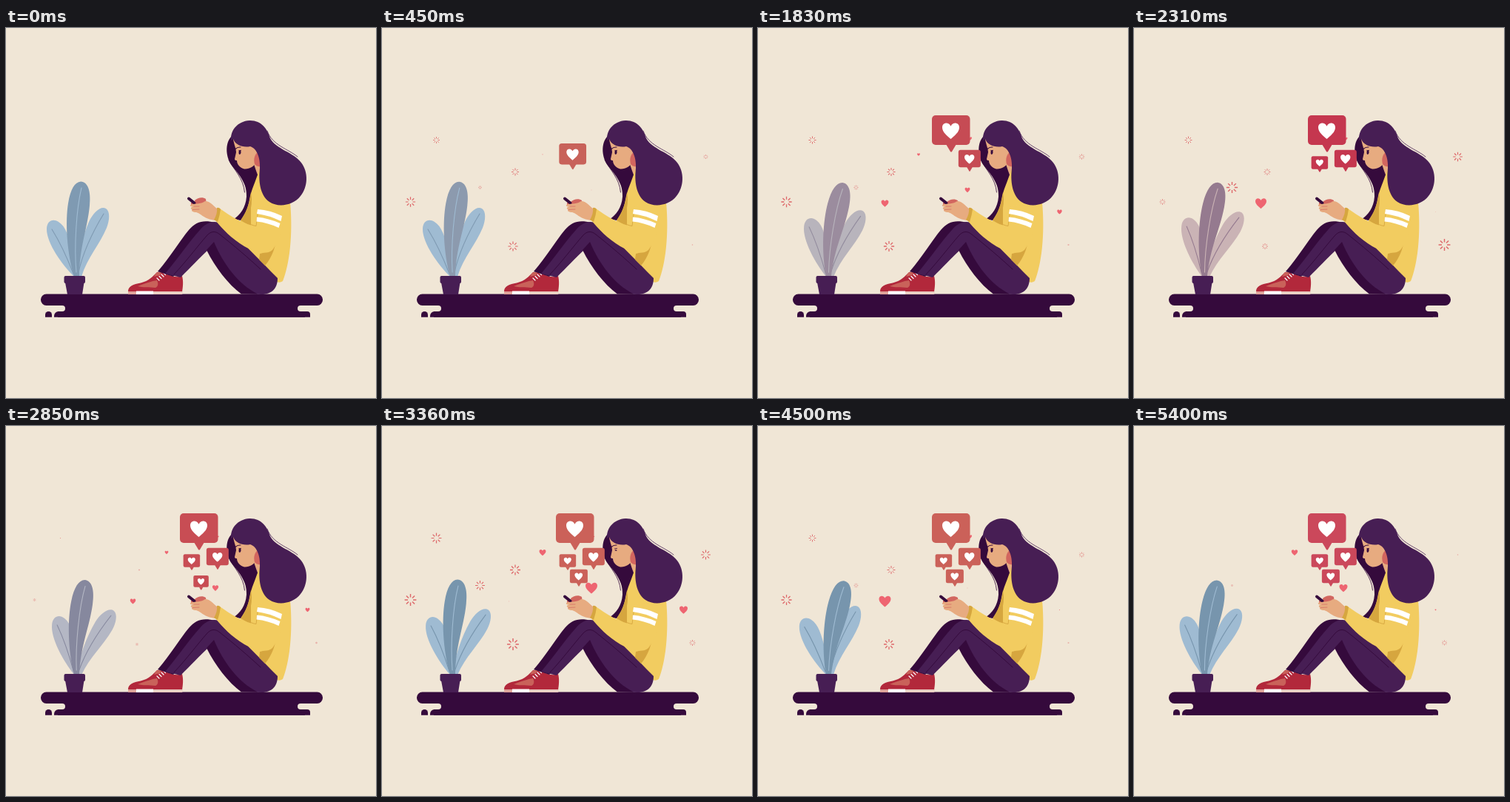
Animation of 500x500 px, one loop 5430 ms. Source, as an HTML page with a canvas:

```html
<!DOCTYPE html>
<html lang="en">
<head>
<meta charset="utf-8">
<title>Girl with phone</title>
<style>
html, body { margin: 0; width: 100%; height: 100%; overflow: hidden; background: #f0e6d6; }
canvas { display: block; width: 500px; height: 500px; }
</style>
</head>
<body>
<canvas id="stage" width="500" height="500"></canvas>
<script>
const ctx = document.getElementById('stage').getContext('2d');
const LOOP = 5430;
const CREAM = '#f0e6d6', DARK = '#350a3c', PURPLE = '#471e54', YELLOW = '#f2cc60',
  OCHRE = '#d6a63f', SKIN = '#e7ab80', BLUSH = '#d2665f', RED = '#b2283b', WHITE = '#fff';

// Shared key times for the slow, organic curves
const KEYS = [0, 450, 1260, 2310, 3360, 4500, 5400, 5430];

const fill = (d, color) => { ctx.fillStyle = color; ctx.fill(new Path2D(d)); };

function line(d, color, width = 1) {
  ctx.strokeStyle = color;
  ctx.lineWidth = width;
  ctx.lineCap = 'round';
  ctx.stroke(new Path2D(d));
}

function box(x, y, w, h, r, color) {
  ctx.fillStyle = color;
  ctx.beginPath();
  ctx.roundRect(x, y, w, h, r);
  ctx.fill();
}

function segment(t) {
  let i = 0;
  while (i < KEYS.length - 2 && t >= KEYS[i + 1]) i++;
  return [i, (t - KEYS[i]) / (KEYS[i + 1] - KEYS[i])];
}

// Smooth curve through one value per key time
function spline(values, t) {
  const v = i => values[Math.min(i, values.length - 1)];
  const slope = i => i < 1 || i > 5 ? 0 : (v(i + 1) - v(i - 1)) / (KEYS[i + 1] - KEYS[i - 1]);
  const [i, u] = segment(t), span = KEYS[i + 1] - KEYS[i];
  const u2 = u * u, u3 = u2 * u;
  return v(i) * (2 * u3 - 3 * u2 + 1) + v(i + 1) * (3 * u2 - 2 * u3)
    + span * (slope(i) * (u3 - 2 * u2 + u) + slope(i + 1) * (u3 - u2));
}

function tint(colors, t) {
  const [i, u] = segment(t);
  const at = k => colors[Math.min(k, colors.length - 1)];
  const mix = s => {
    const a = at(i) >> s & 255, b = at(i + 1) >> s & 255;
    return Math.round(a + (b - a) * u);
  };
  return `rgb(${mix(16)},${mix(8)},${mix(0)})`;
}

function backOut(u) {
  if (u <= 0) return 0;
  if (u >= 1) return 1;
  const c = 1.35, k = u - 1;
  return 1 + (c + 1) * k * k * k + c * k * k;
}

function heart(x, y, w, color) {
  if (w < 0.4) return;
  ctx.save();
  ctx.translate(x, y);
  ctx.scale(w / 20, w / 20);
  fill('M0,9.5 C-4,6 -10,1.5 -10,-4 C-10,-10 -2.5,-11 0,-5.5 C2.5,-11 10,-10 10,-4 C10,1.5 4,6 0,9.5Z', color);
  ctx.restore();
}

const HEARTS = [
  [217, 171, [0, 1, 9, 0, 9, 0, 8.5]],
  [283, 219, [0, 0.6, 16, 0, 16, 0.8, 11]],
  [171.5, 237, [0, 0, 1.2, 15, 0.8, 16, 0]],
  [407.5, 248.5, [0, 0, 13.5, 0.7, 11, 1, 2]],
  [286.5, 149.5, [0, 0, 5, 4, 1.5, 5, 0]]
];

// x, y, largest radius, delay
const SPARKS = [
  [73.5, 151.5, 7, 55], [180, 194.5, 7, 20], [38.5, 235, 8, -40], [132.5, 215.5, 8, 205],
  [177, 295, 8, -35], [437.5, 174, 7.2, 150], [419.5, 293, 8, 345]
];
const SPARK_PERIOD = 1340;

function spark([x, y, max, delay], t) {
  if (t < delay) return;
  const r = max * (0.5 - 0.5 * Math.cos(2 * Math.PI * (t - delay) / SPARK_PERIOD));
  if (r < 0.3) return;
  ctx.strokeStyle = '#dd6668';
  ctx.lineCap = 'butt';
  ctx.lineWidth = Math.max(0.5, r * 0.18);
  ctx.beginPath();
  for (let i = 0; i < 8; i++) {
    const c = Math.cos(i * Math.PI / 4), s = Math.sin(i * Math.PI / 4);
    ctx.moveTo(x + c * r * 0.45, y + s * r * 0.45);
    ctx.lineTo(x + c * r, y + s * r);
  }
  ctx.stroke();
}

// tip x, tip y, width; one pops out of the phone after another
const BUBBLES = [[261, 168, 51.5], [286, 194, 30], [251, 195, 22.5], [266, 217, 24]];
const BUBBLE_TINTS = [0xc8625a, 0xc8625a, 0xc8625a, 0xc5374f, 0xcb6159, 0xcb6159, 0xcb485b];

function bubble([x, y, w], i, t) {
  const p = backOut((t - 371 - i * 791) / 354);
  if (p <= 0) return;
  const color = tint(BUBBLE_TINTS, t);
  ctx.save();
  ctx.translate(250 + (x - 250) * p, 250 + (y - 250) * p);
  ctx.scale(p * w / 51.5, p * w / 51.5);
  box(-26, -50, 51.5, 40, 5, color);
  fill('M-7,-11 L7,-11 L1,-1 Q0,0 -1,-1Z', color);
  heart(-0.5, -29, 23, WHITE);
  ctx.restore();
}

function leaf(shape, rib, color, ribColor, angle) {
  ctx.save();
  ctx.translate(94, 335);
  ctx.rotate(angle);
  ctx.translate(-94, -335);
  fill(shape, color);
  line(rib, ribColor, 1.1);
  ctx.restore();
}

const SIDE_TINTS = [0x9fbbd2, 0x9fbbd2, 0xa3b6c4, 0xcab3b5, 0x9fbbd2];
const MID_TINTS = [0x7f9ab2, 0x8c9aae, 0xa3a2b0, 0x957a8f, 0x7795ad];
const RIB_TINTS = [0x7f9ab2, 0x7f9ab2, 0x8f9fad, 0x957a8f, 0x7795ad];

function plant(t) {
  const side = tint(SIDE_TINTS, t), mid = tint(MID_TINTS, t), rib = tint(RIB_TINTS, t);
  leaf('M92,336 C76,320 55,291 55,272 C55,261 63,257 71,262 C81,268 85,283 90,300 C94,315 96,325 96,336Z',
    'M62,272 Q77,296 91,332', side, rib, spline([0, 0, 4, 11, 5, 1, 8], t) / 78);
  leaf('M94,336 C97,310 102,285 112,262 C118,249 128,240 135,244 C141,248 140,260 136,270 C127,292 110,310 102,336Z',
    'M132,251 Q106,294 98,330', side, rib, spline([0, 0, 2, 11, 9, 0, 8], t) / 91);
  leaf('M92,336 C82,302 80,262 84,237 C87,218 93,208 101,207.5 C111,208 115,221 113,240 C110,272 99,296 99,336Z',
    'M95,330 C92,295 95,245 102,216', mid, side, spline([0, 3, 12, 12, 1, 15, 11], t) / 127);
  fill('M80,344 L105.5,344 L103,360 L83,360Z', PURPLE);
  box(78.5, 335, 28.5, 10, 2, PURPLE);
}

function floor() {
  box(47, 359.5, 381, 15.5, 7.5, DARK);
  box(70, 370, 334, 20.7, 0, DARK);
  box(65, 383, 346, 7.7, [6, 4, 0, 0], DARK);
  box(53, 383, 9, 7.7, [4.5, 4.5, 0, 0], DARK);
  box(60, 375, 20, 8, [0, 4, 4, 0], CREAM);
  box(394, 375, 20, 8, [4, 0, 0, 4], CREAM);
}

function head(t) {
  fill('M305,146 C295,156 297,176 306,187 C316,199 326,211 325,228 C324,243 316,253 308,258 L326,262 C334,238 337,215 343,200 L340,180Z', DARK);
  line('M301,178 C308,192 321,203 322.5,222', DARK, 0.8);
  fill('M333,175 L344,172 L344,208 C341,202 337,190 335,184Z', SKIN);
  fill('M307,150 C308,157 311,163 311,168 L309,177 Q309,179 312,179 C312,184 316,189 322,190.5 C329,191 335,187 338,182 L343,175 L338,155Z', SKIN);
  fill('M343,166 C336,169 334,177 336,184 C338,186 341,188 344,187Z', BLUSH);
  line('M310,163.5 Q313,160.5 317,161', DARK, 1.1);
  const shut = Math.max(0, 1 - Math.abs(t - 3360) / 90);
  ctx.fillStyle = DARK;
  ctx.beginPath();
  ctx.ellipse(316, 168, 1.5, 3 - 2.3 * shut, 0.1, 0, 7);
  ctx.fill();
  line('M314.5,165.8 L317.5,165.4', DARK, 0.8);
}

function torso() {
  fill('M342,192 C338,206 331,219 329,232 C327,244 322,253 317,260 L318,290 L366,343 Q370,345 374,342 C383,320 388,280 384,235 L360,198Z', YELLOW);
  fill('M331,222 C329,240 323,252 317,260 L331,268 L331,243 Q333,232 331,222Z', OCHRE);
}

function legs() {
  fill('M205,329 C222,309 236,286 247,273 C257,261 267,259 283,263 L272,290 L226,336Z', DARK);
  fill('M215,332 C232,312 249,287 262,273 C271,262 283,258 294,267 C317,286 345,316 367,338 C367,350 361,360 345,360 L320,359 C302,346 285,325 273,300 C262,310 249,324 236,337Z', PURPLE);
  fill('M271,300 L281,289 C294,320 314,346 340,359.5 L318,359.5 C300,346 283,324 271,300Z', DARK);
  line('M227,333 C243,316 258,296 271,281 C277,274 283,274 289,279 C308,294 328,311 344,326', DARK, 1);
}

function shoe() {
  fill('M165,356 C165,349 172,346 182,344.5 C193,342 199,335 204,330 L215,329 C219,335 230,338 238,335 C240,343 239,350 238,357Z', RED);
  fill('M178,349 C188,345 197,342 204,341 C206,345 206,349 202,351 C193,350 185,351 178,349Z', '#c9625a');
  fill('M203,331 L211,329 L208,334 L200,336Z', '#c9625a');
  line('M204,338 l3,3 M207,335.5 l3,3 M210,333 l3,3 M213,331 l2.5,2.5', WHITE, 1.2);
  box(165, 356, 73.5, 4, 1, '#ead0c4');
  box(165, 356, 11, 4, 1, '#dfa39a');
  box(176, 355.5, 23, 4.5, 0, WHITE);
}

function arm(t) {
  fill('M343,305 C357,303 363,290 366,275 C366,294 359,311 350,321 L342,313Z', OCHRE);
  fill('M289,244 C303,254 322,266 338,268 L342,240 L380,238 C377,262 369,289 360,300 C351,308 335,302 322,295 C305,285 292,271 283,260Z', YELLOW);
  line('M322,261 Q332,267 338,267.5 L340,252', OCHRE, 0.9);
  fill('M340,245 Q357,246 373,254 L371.5,261 Q355,253 339,251Z', WHITE);
  fill('M339,255.5 Q355,257 370.5,264 L368.5,270 Q354,263 338.5,261.5Z', WHITE);

  const tap = spline([0, 2, 2, 2, 0, 1, 0], t);
  fill(`M255,${233 + tap} C259,${229 + tap} 266,${228 + tap} 270,${231 + tap} L271,240 L256,241Z`, BLUSH);
  fill('M250,236 L258,235 L257,241 L250,241Z', BLUSH);
  line('M247,230.5 L254.5,236.5', DARK, 4);
  fill('M288,246 C281,242 277,234 269,234 C264,238 257,237 250,238.5 C247,240 250,242 254,241.5 C250,241.5 248,244 252,245.5 C249,247 253,249 257,249 C264,251 267,258 283,260Z', SKIN);
  line('M254,241 L261,241 M252,245.5 L261,245', BLUSH, 0.7);
  fill('M285,243 Q288,242 290,245 Q289,253 286,262 L281,259 Q286,251 285,243Z', OCHRE);
}

function hair() {
  fill('M304,152 C303,138 313,126 329,125 C345,124.5 353,136 357,149 C365,164 389,168 399,182 C409,195 408,215 398,227 C388,240 368,243 356,235 C343,226 341,206 343,190 C344,178 340,163 330,160 C320,162 310,158 307,150Z', PURPLE);
  line('M353,139 C360,159 381,163 394,174', PURPLE, 0.8);
}

function draw(t) {
  ctx.fillStyle = CREAM;
  ctx.fillRect(0, 0, 500, 500);
  floor();
  plant(t);
  head(t);
  torso();
  shoe();
  legs();
  arm(t);
  hair();
  SPARKS.forEach(s => spark(s, t));
  HEARTS.forEach(([x, y, sizes]) => heart(x, y, spline(sizes, t), '#ee6571'));
  BUBBLES.forEach((b, i) => bubble(b, i, t));
}

const begin = performance.now();
function tick() {
  const t = (performance.now() - begin) % LOOP;
  draw(Math.floor(t / 30) * 30);
  requestAnimationFrame(tick);
}
tick();
</script>
</body>
</html>
```
